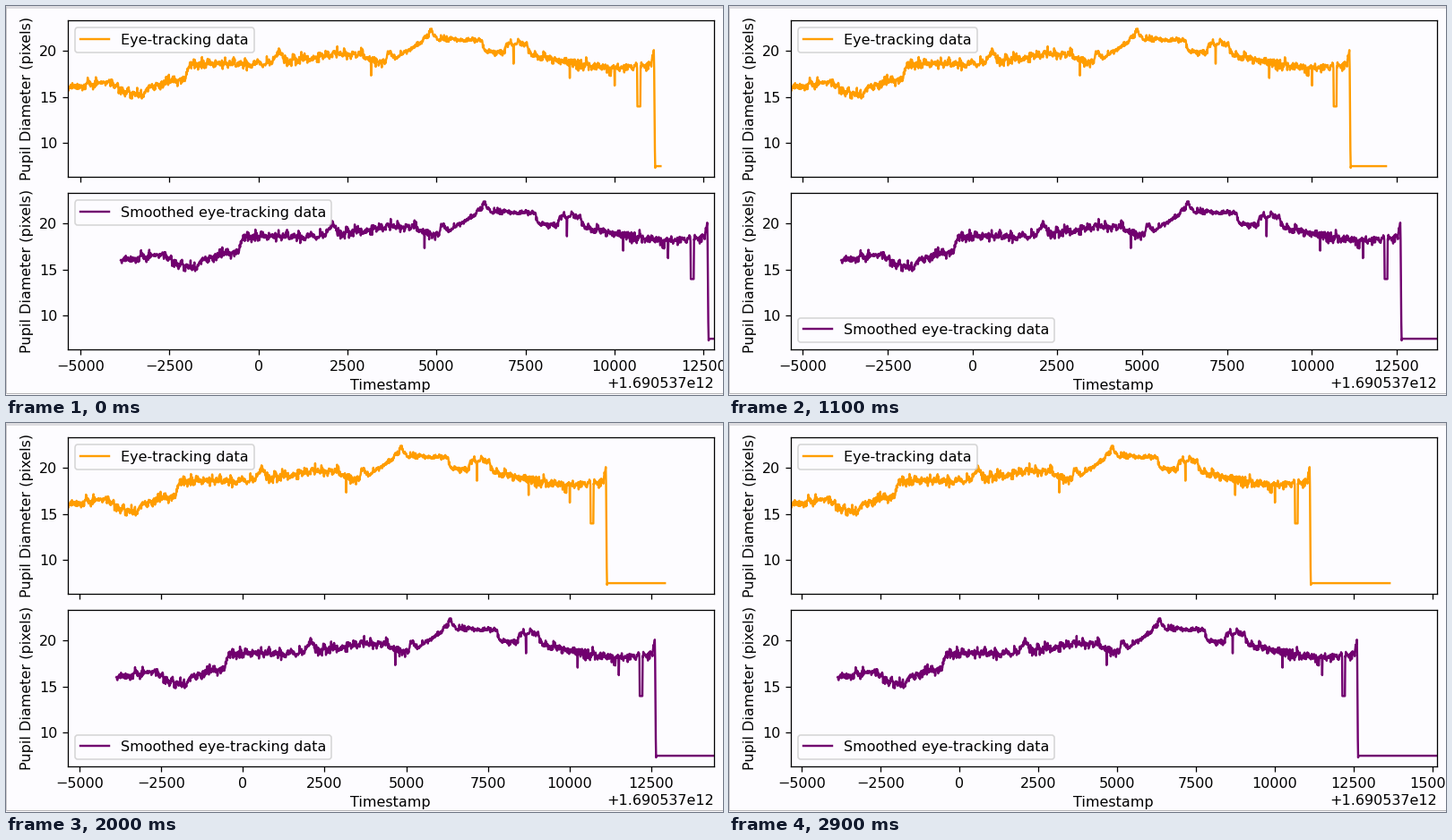
A matplotlib script that plays this animation: 800 by 435 pixels, repeating every 3 s.

```python
import numpy as np
import matplotlib.pyplot as plt
from matplotlib.animation import FuncAnimation
from matplotlib.patches import Rectangle
from matplotlib.ticker import FuncFormatter, MultipleLocator

W, H, DPI = 800, 435, 115.2
FRAMES, INTERVAL = 30, 100
BACK = "#fdfcff"
ORANGE, PURPLE = "#ff9d00", "#71006f"
T_START, T_RIGHT, T_STEP = -5365, 12784, 81
LAG = 1500

plt.rcParams.update({"font.family": "DejaVu Sans", "font.size": 10,
                     "axes.facecolor": BACK, "figure.facecolor": BACK})

# Main turning points (time, pupil diameter); the rest is seeded noise.
KEYS = [(-5365, 16.0), (-4200, 16.7), (-3400, 15.2), (-2900, 16.4),
        (-2050, 17.0), (-1950, 18.5), (200, 18.6), (600, 19.8),
        (760, 18.8), (2600, 19.9), (3570, 18.6), (3640, 20.0),
        (3860, 19.2), (4450, 20.6), (4880, 22.2), (5020, 21.2),
        (6290, 21.2), (6340, 19.9), (6910, 19.8), (6960, 20.8),
        (7540, 20.8), (7590, 19.7), (8700, 18.8), (10000, 18.0),
        (11040, 18.3), (11110, 20.2), (11140, 7.15), (11150, 7.52)]
DIPS = [3164, 7165, 8750, 10008]


def make_signal():
    rng = np.random.default_rng(7)
    t = np.arange(T_START, 14000, 10.0)
    v = np.interp(t, *zip(*KEYS))
    drift = np.repeat(rng.normal(size=t.size // 8 + 1), 8)[:t.size]
    jitter = rng.standard_t(4, t.size)
    calm = np.where((t > 3600) & (t < 8000), 0.6, 1)
    noise = calm * np.clip(0.18 * drift + 0.17 * jitter, -0.8, 0.8)
    v += np.where(t < 11080, noise, 0)
    for dip in DIPS:
        v[np.argmin(abs(t - dip))] -= 2
    v[(t > 10637) & (t < 10735)] = 13.97
    return t, np.minimum(v, 22.45)


def strip(bottom, left, width, height, color):
    fig.add_artist(Rectangle((left, bottom), width, height, fc=color,
                             lw=0, transform=None))


t, v = make_signal()
fig, axes = plt.subplots(2, sharex=True, dpi=DPI,
                         figsize=((W + 0.001) / DPI, (H + 0.001) / DPI))

lines, legends = [], []
rows = [(243.6, "Eye-tracking data", ORANGE),
        (50.6, "Smoothed eye-tracking data", PURPLE)]
for ax, (bottom, label, color) in zip(axes, rows):
    ax.set_position([68.5 / W, bottom / H, 721 / W, 175 / H])
    ax.set_ylim(6.33, 23.24)
    ax.yaxis.set_major_locator(MultipleLocator(5))
    ax.set_ylabel("Pupil Diameter (pixels)")
    lines += ax.plot([], [], color=color, lw=1.5, label=label)
    legends.append(ax.legend(loc="upper left"))

formatter = FuncFormatter(lambda x, _: f"{x:.0f}".replace("-", "\u2212"))
formatter.set_offset_string("+1.690537e12")
axes[1].xaxis.set_major_locator(MultipleLocator(2500))
axes[1].xaxis.set_major_formatter(formatter)
axes[1].set_xlabel("Timestamp")

strip(H - 3, 0, W, 3, "#dddce0")
strip(1, 0, W, 1, "#b4b3b6")
strip(1, 0, 1, H - 2, "#cbc9cd")


def update(i):
    right = T_RIGHT + T_STEP * i
    seen = t <= right - LAG + 15
    lines[0].set_data(t[seen], v[seen])
    lines[1].set_data(t[seen] + LAG, v[seen])
    axes[1].set_xlim(T_START, right)
    legends[1].set_loc("upper left" if i == 0 else "lower left")
    return lines


anim = FuncAnimation(fig, update, frames=FRAMES, interval=INTERVAL,
                     repeat=True, repeat_delay=0, blit=False)
plt.show()
```
